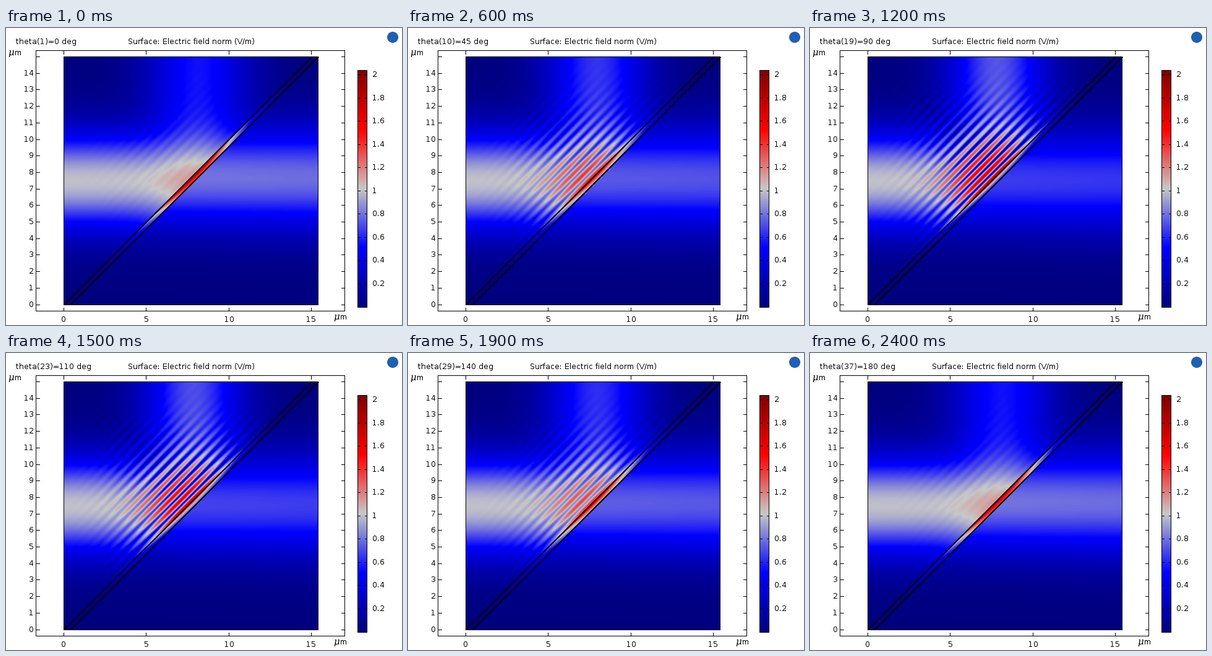
Write a matplotlib script that moves like this. It is 640 by 480 pixels and loops after 2.5 s.

```python
import numpy as np
import matplotlib.pyplot as plt
from matplotlib.animation import FuncAnimation
from matplotlib.colors import LinearSegmentedColormap
from matplotlib.patches import Circle, Rectangle

W, H, DPI = 640, 480, 100
FRAMES, LOOP = 25, 2500
PX = 72 / DPI                      # points per pixel
plt.rcParams.update({"font.family": "DejaVu Sans", "text.hinting": "default",
                     "text.hinting_factor": 1})

# Scale of the plot: pixels per micrometre and pixel of (0, 0)
SCALE, X0, Y0 = 26.7, 93, 447
LEFT, TOP, RIGHT, BOTTOM = 93, 46, 505, 448
VMAX = 2.04

# Optics: Gaussian beam on a thin air gap between two glass prisms (um)
LAM, N, GAP, WAIST, YC = 1.0, 1.5, 0.4 / np.sqrt(2), 3.0, 7.5


def sx(x):
    return X0 + SCALE * x


def sy(y):
    return Y0 - SCALE * y


def solve():
    """Squared field norm for in-plane and out-of-plane polarization."""
    x = (np.arange(LEFT, RIGHT) - X0) / SCALE
    y = (Y0 - np.arange(TOP, BOTTOM)) / SCALE
    u = (x[None, :] - y[:, None]) / np.sqrt(2)
    front, back = u < 0, u > GAP
    inside = ~(front | back)

    k0 = 2 * np.pi / LAM
    k1 = N * k0
    q = np.linspace(-2, 2, 49)
    spec = np.exp(-(q * WAIST) ** 2 / 4 - 1j * q * YC)
    spec = spec / np.abs(spec).sum()
    kx = np.sqrt(k1**2 - q**2)
    ku, kv = (kx - q) / np.sqrt(2), (kx + q) / np.sqrt(2)
    kg = np.sqrt(k0**2 - kv**2 + 0j)
    hop = np.exp(1j * kg * GAP)

    def wave(kn, amp):
        """Sum plane waves with normal part kn and tangential part kv."""
        ax, ay = (kn + kv) / np.sqrt(2), (kv - kn) / np.sqrt(2)
        ex = np.exp(1j * np.outer(ax, x))
        ey = np.exp(1j * np.outer(y, ay))
        return [(ey * (amp * f)) @ ex for f in (1, ay, -ax)]

    def fields(weight):
        r = (ku * weight - kg) / (ku * weight + kg)
        a = spec * (1 + r) / (1 - (r * hop) ** 2)
        refl = spec * r * (1 - hop**2) / (1 - (r * hop) ** 2)
        trans = a * (1 - r) * hop * np.exp(-1j * ku * GAP)
        before = np.add(wave(ku, spec), wave(-ku, refl))
        within = np.add(wave(kg, a), wave(-kg, -a * r * hop**2))
        after = wave(ku, trans)
        return before, within, after

    def power(parts, scales):
        out = np.zeros(u.shape)
        for mask, part, s in zip((front, inside, back), parts, scales):
            out[mask] = sum(np.abs(c[mask] * s) ** 2 for c in part)
        return out

    flat = power([p[1:] for p in fields(1 / N**2)],
                 (1 / k1, N**2 / k1, 1 / k1))
    upright = power([p[:1] for p in fields(1)], (1, 1, 1))
    return flat, upright


flat, upright = solve()
g = 200 / 255
wave_map = LinearSegmentedColormap.from_list(
    "wave", [(0, 0, 0.5), (0, 0, 1), (g, g, g), (1, 0, 0), (0.5, 0, 0)], N=512)

fig = plt.figure(figsize=(W / DPI, H / DPI), dpi=DPI, facecolor="white")
ax = fig.add_axes([0, 0, 1, 1])


# Straight strokes snap to the pixel whose index is given
def line(xs, ys):
    ax.plot(xs, ys, color="black", lw=PX, antialiased=False,
            solid_capstyle="butt", zorder=3)


def box(x1, y1, x2, y2):
    ax.add_patch(Rectangle((x1, y1), x2 - x1, y2 - y1, fill=False, ec="black",
                           lw=PX, antialiased=False, zorder=3))


def label(x, y, s, size=12, **kw):
    return ax.text(x, y, s, fontsize=size * PX, **kw)


def unit(x, y):
    label(x, y, "μ", 15, family="DejaVu Serif", style="italic")
    label(x + 11, y, "m")


image = ax.imshow(np.sqrt(flat), cmap=wave_map, vmin=0, vmax=VMAX,
                  extent=(LEFT, RIGHT, BOTTOM, TOP), interpolation="nearest")
ax.imshow(np.linspace(VMAX, 0, 383)[:, None], cmap=wave_map, vmin=0, vmax=VMAX,
          extent=(568, 584, 451, 68), interpolation="nearest")
ax.set(xlim=(0, W), ylim=(H, 0), aspect="auto")
ax.axis("off")

box(48, 36, 547, 457)
box(93, 46, 504, 447)
box(568, 68, 583, 451)
for off in (0, 0.4):
    x = round(sx(off)) + 0.5
    line([x, x + 15 * SCALE], [sy(0) + 0.5, sy(15) + 0.5])

for v in range(16):
    y = int(sy(v))
    line([49, 54], [y, y])
    line([542, 547], [y, y])
    if v < 15:
        label(44.5, y + 4, str(v), ha="right")
for v in (0, 5, 10, 15):
    x = int(sx(v))
    line([x, x], [37, 42])
    line([x, x], [452, 457])
    label(x + 0.5, 475, str(v), ha="center")
for i in range(1, 11):
    y = int(451 - 187.7 * i * 0.2)
    line([569, 572], [y, y])
    line([580, 583], [y, y])
    label(592, y + 4, f"{i * 0.2:.1g}" if i % 5 == 0 else f"{i * 0.2:.1f}")

unit(3, 44)
unit(529, 471)
label(197, 26, "Surface: Electric field norm (V/m)")
title = label(16, 26, "")
ax.add_patch(Circle((625, 15), 9, color="#1f5fb4", lw=0))


def update(i):
    step = i * 36 // (FRAMES - 1)
    angle = 5 * step
    c, s = np.cos(np.radians(angle)), np.sin(np.radians(angle))
    image.set_data(np.sqrt(c**2 * flat + s**2 * upright))
    title.set_text(f"theta({step + 1})={angle} deg")
    return image, title


anim = FuncAnimation(fig, update, frames=FRAMES, interval=LOOP / FRAMES,
                     init_func=lambda: update(0), repeat=True, repeat_delay=0)
plt.show()
```
